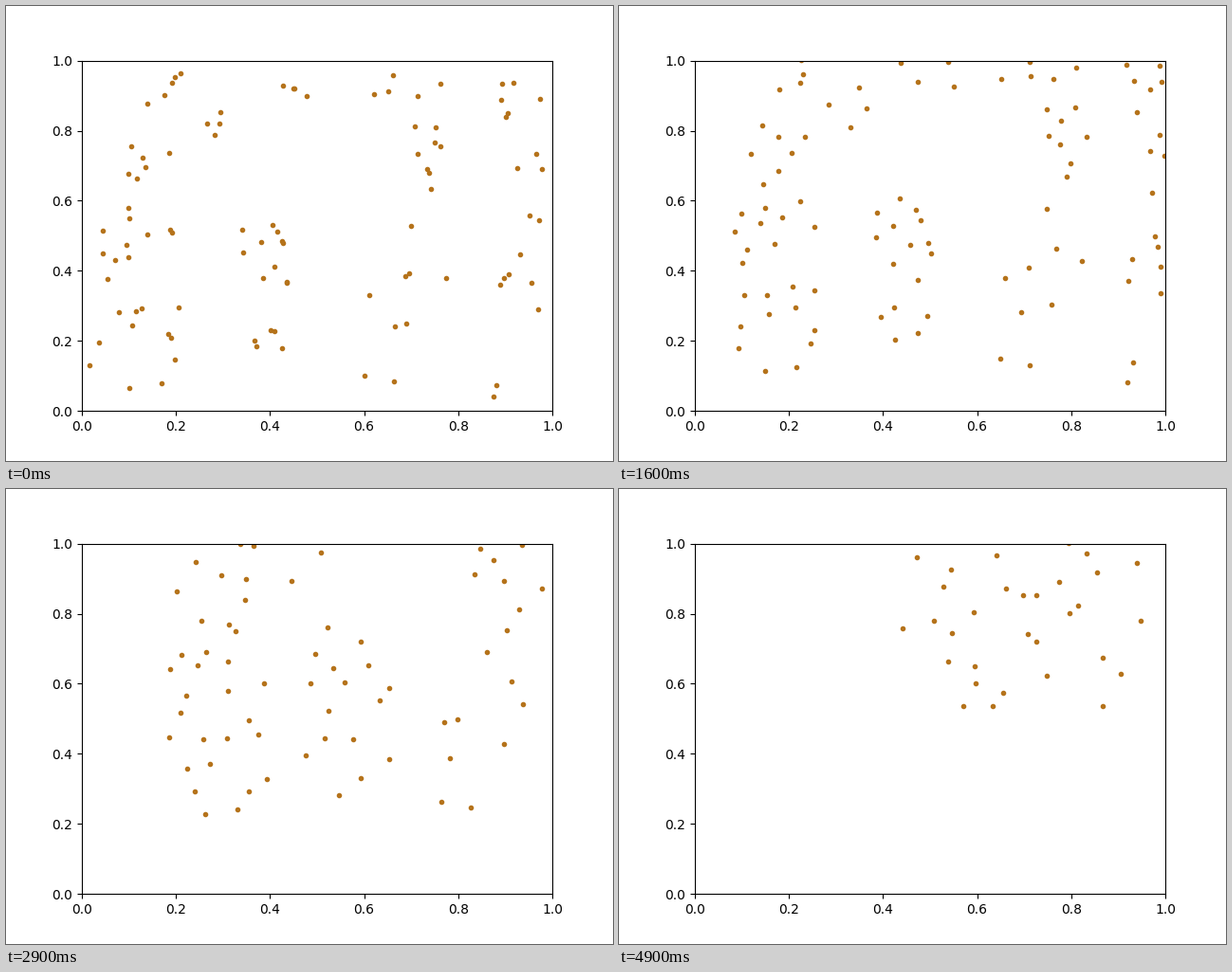
A matplotlib script that plays this animation: 640x480 px, repeating every 5 s.

```python
import numpy as np
import matplotlib.pyplot as plt
from matplotlib.animation import FuncAnimation

FRAMES = 50
DRIFT = 4e-4    # constant pull towards the upper right
PUSH = 4.5e-4   # strongest repulsion, at contact
REACH = 0.055   # distance at which repulsion fades out

# Loose groups of dots: x range, y range, count
GROUPS = [
    ((0.00, 0.21), (0.03, 0.30), 12),
    ((0.00, 0.20), (0.36, 0.77), 17),
    ((0.12, 0.30), (0.77, 0.98), 9),
    ((0.33, 0.48), (0.35, 0.62), 11),
    ((0.36, 0.43), (0.14, 0.26), 5),
    ((0.39, 0.60), (0.83, 0.94), 4),
    ((0.60, 0.78), (0.02, 0.97), 22),
    ((0.83, 0.99), (0.03, 0.56), 10),
    ((0.89, 0.98), (0.65, 0.97), 9),
]


def scatter(rng):
    return np.vstack([
        np.column_stack([rng.uniform(*xr, n), rng.uniform(*yr, n)])
        for xr, yr, n in GROUPS])


def strength(dist):
    return PUSH * np.clip(1 - dist / REACH, 0, 1)


def acceleration(pos):
    gap = pos[:, None] - pos[None]
    dist = np.maximum(np.hypot(gap[..., 0], gap[..., 1]), 1e-9)
    pairs = (gap * (strength(dist) / dist)[..., None]).sum(axis=1)
    walls = sum(np.sign(pos - w) * strength(np.abs(pos - w)) for w in (0, 1))
    return DRIFT + pairs + walls


def simulate(pos):
    vel = np.zeros_like(pos)
    path = [pos]
    for _ in range(FRAMES - 1):
        acc = acceleration(pos)
        pos = pos + vel
        vel = vel + acc
        path.append(pos)
    return path


fig, ax = plt.subplots(figsize=(6.4, 4.8), dpi=100)
ax.set_xlim(0, 1)
ax.set_ylim(0, 1)
dots, = ax.plot([], [], ".", color="#b5731b", markersize=6)

path = simulate(scatter(np.random.default_rng(4)))


def update(i):
    dots.set_data(path[i][:, 0], path[i][:, 1])
    return dots,


anim = FuncAnimation(fig, update, frames=FRAMES, interval=100, repeat=True,
                     repeat_delay=0)
plt.show()
```
